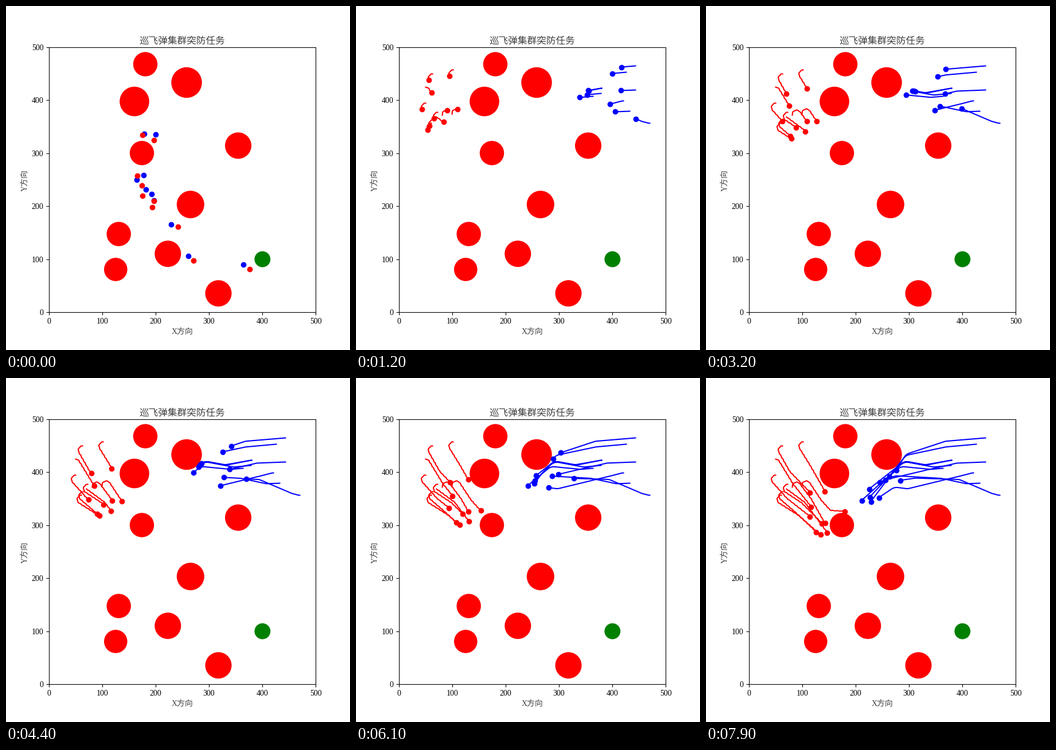
Recreate the animation shown at these times as a matplotlib script. Size 600 by 600 pixels, loop 8000 ms.

```python
import numpy as np
import matplotlib.pyplot as plt
from matplotlib.animation import FuncAnimation
from matplotlib.patches import Circle

plt.rcParams["font.family"] = ["Liberation Serif", "Noto Sans CJK JP"]

FRAMES, STEP_MS, SIZE = 80, 100, 600
W, E, N = -1, 1, -0.2 - 1j  # launch headings, y downwards
STYLE = {"red": dict(radius=7.5, weave=0.4), "blue": dict(radius=16, weave=0)}

fig, ax = plt.subplots(figsize=(6, 6), dpi=100)
ax.set(xlim=(0, 500), ylim=(0, 500))

# Overlay whose units are stage pixels
stage = fig.add_axes([0, 0, 1, 1], xlim=(-0.5, SIZE - 0.5), ylim=(SIZE - 0.5, -0.5),
                     frame_on=False, xticks=[], yticks=[])


def label(x, y, text, size, angle=0):
    stage.text(x, y, text, size=size, rotation=angle, rotation_mode="anchor",
               ha="center", va="baseline", color="#404040")


def disc(x, y, r, color="red"):
    stage.add_patch(Circle((x, y), r, color=color, lw=0))


def steer(start, heading, goals, radius, weave, ds=0.5):
    """Chase the goals in turn with a limited turning circle, at even pace."""
    pos, course = start, heading / abs(heading)
    route = [pos]
    for goal in goals:
        reach = 1 if goal == goals[-1] else 4
        while abs(goal - pos) > reach and len(route) < 1000:
            turn = np.clip(np.angle((goal - pos) / course), -ds / radius, ds / radius)
            course *= np.exp(1j * turn)
            pos += ds * course
            route.append(pos)
    route = np.array(route + [goals[-1]])
    dist = np.concatenate([[0], np.cumsum(abs(np.diff(route)))])
    sideways = 1j * np.gradient(route)
    route = route + weave * np.sin(dist * 0.8) * sideways / (abs(sideways) + 1e-9)
    return np.interp(np.linspace(0, dist[-1], FRAMES - 1), dist, route)


missiles = []


def missile(color, final, start, heading, *goals):
    line, = stage.plot([], [], color=color, lw=1.5, marker="o", ms=6, markevery=[-1])
    path = steer(complex(*start), heading, [complex(*g) for g in goals], **STYLE[color])
    missiles.append((line, path, final))


label(307, 65, "巡飞弹集群突防任务", 12)
label(307, 571.8, "X方向", 10)
label(36.5, 303.5, "Y方向", 10, 90)

for zone in [(242.5, 101, 21.2), (314.5, 133, 26.7), (223.5, 166, 25.8), (236.5, 256, 21.2),
             (404.5, 243, 23), (321.3, 345.7, 24), (196.2, 397.2, 21.2), (281.8, 431.7, 23),
             (190.8, 459, 20.3), (370, 500.7, 23)]:
    disc(*zone)
disc(446.8, 441.2, 13.9, "green")

# Resting place, launch point and heading, then the points flown through
missile("blue", (240, 222), (487, 104), W, (415, 110), (350, 132), (331, 160))
missile("blue", (260, 223), (471, 115), W, (415, 120), (350, 134), (319, 171))
missile("blue", (239, 294), (487, 146), W, (435, 148), (380, 161), (312, 177))
missile("blue", (227, 302), (428, 143), W, (381, 152), (349, 145), (284, 193))
missile("blue", (243, 319), (428, 143), W, (381, 151), (349, 145), (321, 169), (285, 207))
missile("blue", (253, 327), (427, 152), W, (395, 155), (349, 146), (321, 169), (287, 215))
missile("blue", (257, 338), (413, 157), W, (389, 159), (342, 154), (305, 182), (271, 213))
missile("blue", (287, 380), (466, 165), W, (441, 171), (350, 193), (330, 190), (301, 208))
missile("blue", (317, 435), (477, 183), W, (452, 184), (407, 174), (330, 170), (302, 181))
missile("blue", (413, 450), (512, 204), W, (495, 200), (440, 176), (362, 174), (338, 178))

missile("red", (237, 224), (133, 118), W, (147, 165), (181, 199))
missile("red", (257, 233), (169, 111), W, (183, 155), (207, 197))
missile("red", (228, 295), (121, 141), E, (153, 187), (183, 224))
missile("red", (236, 312), (121, 169), W, (143, 212), (181, 241))
missile("red", (237, 330), (150, 190), N, (185, 213), (207, 253))
missile("red", (254, 350), (167, 188), N, (202, 215), (217, 231), (242, 232))
missile("red", (257, 339), (142, 185), W, (169, 219), (202, 253))
missile("red", (299, 384), (140, 193), E + 1j, (174, 218), (211, 269))
missile("red", (326, 443), (134, 198), W, (157, 235), (192, 268))
missile("red", (424, 458), (131, 204), W, (164, 241), (199, 273))


def update(k):
    # The loop opens at rest, then the flight starts over
    for line, path, final in missiles:
        trail = path[:k] if k else np.array([complex(*final)])
        line.set_data(trail.real, trail.imag)
    return [m[0] for m in missiles]


anim = FuncAnimation(fig, update, frames=FRAMES, interval=STEP_MS, repeat=True, repeat_delay=0)
plt.show()
```
